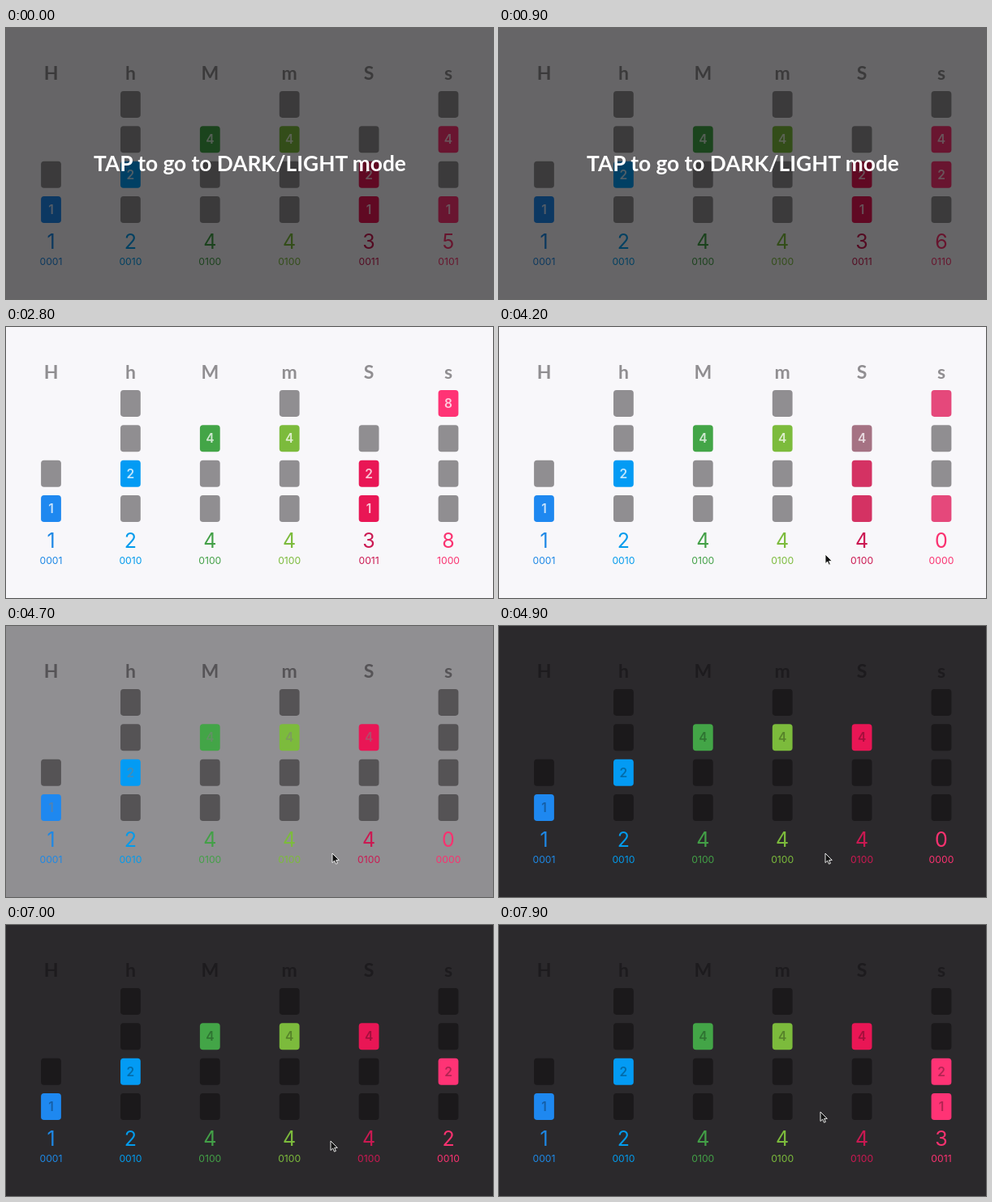
An HTML page that plays this animation: 600 px wide and 335 px high, repeating every 8000 ms.

```html
<!DOCTYPE html>
<html lang="en">
<head>
<meta charset="utf-8">
<title>Binary clock</title>
<style>
  html, body { margin: 0; width: 100%; height: 100%; overflow: hidden; }
  svg { display: block; width: 100vw; height: 100vh; }
  text { text-anchor: middle; font-family: Inter, Roboto, sans-serif; }
  .head { font: 700 23px Lato, sans-serif; }
  .bit { font-size: 15.5px; font-weight: 600; }
  .digit { font-size: 25px; }
  .code { font-size: 12.2px; }
  .hint { font: 700 26.3px Lato, sans-serif; fill: #fff; }
</style>
</head>
<body>
<svg id="stage" viewBox="0 0 600 335">
  <rect id="back" width="600" height="335"/>
  <g id="clock"></g>
  <g id="overlay">
    <rect width="600" height="335" fill="#000" fill-opacity=".59"/>
    <text class="hint" x="300.5" y="177">TAP to go to DARK/LIGHT mode</text>
  </g>
  <path id="cursor" d="M0 0V11.6L2.7 9.1L4.5 13.2L6.4 12.4L4.7 8.4H8.3Z"
        fill="#111" stroke="#fff" stroke-width=".9" stroke-linejoin="round"/>
</svg>
<script>
  const LOOP = 8000, TICK = 120, FADE = 350;
  const $ = id => document.getElementById(id);

  // Light and dark values of the theme
  const theme = {
    back: [[248, 247, 250], [43, 41, 44]],
    off: [[144, 142, 145], [27, 25, 27]],
    head: [[144, 142, 145], [29, 27, 30]],
    label: [[255, 255, 255, .75], [0, 0, 0, .3]]
  };

  const seconds = t => 125 + Math.floor((t - TICK) / 1000) + 1 - 90;
  const columns = [
    { name: 'H', rows: 2, color: [30, 136, 240], ink: [30, 136, 229], value: () => 1 },
    { name: 'h', rows: 4, color: [3, 155, 244], ink: [3, 155, 236], value: () => 2 },
    { name: 'M', rows: 3, color: [67, 165, 71], ink: [67, 160, 71], value: () => 4 },
    { name: 'm', rows: 4, color: [124, 187, 60], ink: [124, 187, 60], value: () => 4 },
    { name: 'S', rows: 3, color: [233, 22, 85], ink: [203, 25, 82], value: t => Math.floor(seconds(t) / 10) },
    { name: 's', rows: 4, color: [255, 51, 117], ink: [250, 50, 112], value: t => seconds(t) % 10 }
  ];

  const clamp = v => Math.min(1, Math.max(0, v));
  const ramp = (t, from, to) => clamp((t - from) / (to - from));
  const smooth = p => p * p * (3 - 2 * p);
  const mix = (a, b, p) => a.map((v, i) => v + (b[i] - v) * p);
  const css = ([r, g, b, a = 1]) =>
    `rgba(${Math.round(r)},${Math.round(g)},${Math.round(b)},${a})`;

  function add(tag, attrs, text = '') {
    const el = document.createElementNS('http://www.w3.org/2000/svg', tag);
    for (const key in attrs) el.setAttribute(key, attrs[key]);
    el.textContent = text;
    return $('clock').appendChild(el);
  }

  columns.forEach((col, i) => {
    const x = 55.5 + i * 97.9;
    const word = (cls, y, text) => add('text', { class: cls, x, y }, text);
    col.head = word('head', 64, col.name);
    col.cells = Array.from({ length: col.rows }, (_, row) => {
      const y = 224.6 - row * 43.4;
      const box = add('rect', { x: x - 12.4, y: y - 16.5, width: 24.8, height: 33, rx: 3.8 });
      return { bit: 1 << row, box, label: word('bit', y + 5.6, 1 << row) };
    });
    col.digit = word('digit', 272.5);
    col.code = word('code', 293.4);
    col.digit.style.fill = col.code.style.fill = css(col.ink);
  });

  // Cursor stops: time, x, y
  const path = [
    [3150, 405, 340], [3600, 403, 299], [4100, 402, 281],
    [6500, 402, 281], [7000, 400, 267], [7900, 396, 231], [8000, 396, 229]
  ];

  function cursorAt(t) {
    const i = path.findIndex(stop => stop[0] > t);
    if (i < 1) return path[0];
    const a = path[i - 1], b = path[i];
    return mix(a, b, ramp(t, a[0], b[0]));
  }

  function draw(t) {
    const dark = smooth(ramp(t, 4550, 4850));
    const tone = key => mix(...theme[key], dark);
    const off = tone('off');
    const age = (t - TICK + 1000) % 1000;
    const fade = clamp(age / FADE);

    $('back').style.fill = css(tone('back'));
    for (const col of columns) {
      const now = col.value(t);
      const before = t < TICK ? now : col.value(t - age - 1);
      col.head.style.fill = css(tone('head'));
      col.digit.textContent = now;
      col.code.textContent = now.toString(2).padStart(4, '0');
      for (const { bit, box, label } of col.cells) {
        const was = before & bit ? 1 : 0, is = now & bit ? 1 : 0;
        box.style.fill = css(mix(off, col.color, was + (is - was) * fade));
        label.style.fill = css(tone('label'));
        label.style.visibility = is ? 'visible' : 'hidden';
      }
    }

    $('overlay').style.opacity = 1 - smooth(ramp(t, 2000, 2600));
    const [, x, y] = cursorAt(t);
    $('cursor').setAttribute('transform', `translate(${x} ${y})`);
    $('cursor').style.visibility = t < path[0][0] ? 'hidden' : 'visible';
  }

  const start = performance.now();
  function frame() {
    draw((performance.now() - start) % LOOP);
    requestAnimationFrame(frame);
  }
  frame();
</script>
</body>
</html>
```
